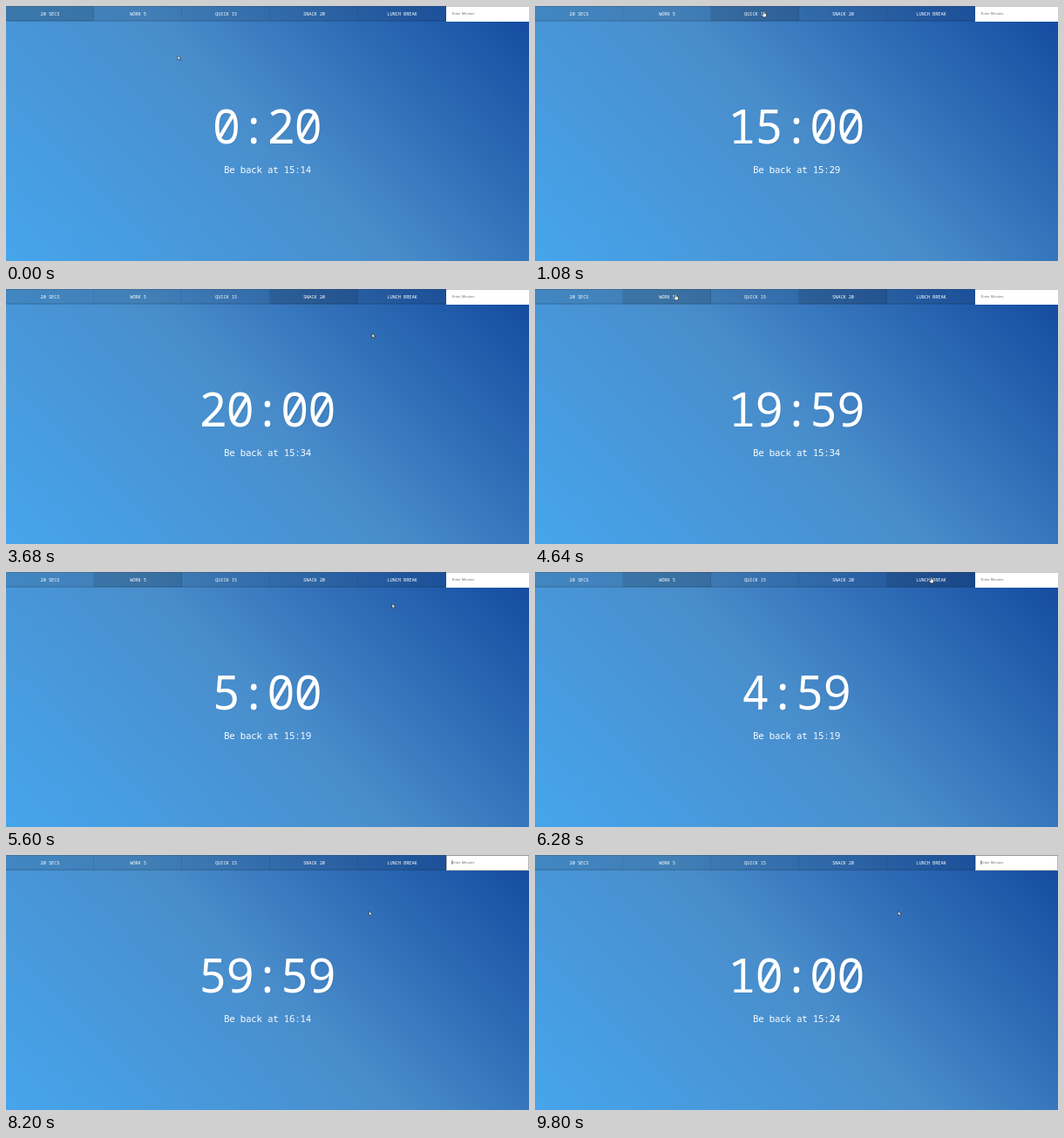
Recreate the animation shown at these times as an HTML page. Size 600 by 293 pixels, loop 9.96 s.

```html
<!DOCTYPE html>
<html lang="en">
<head>
<meta charset="utf-8">
<title>Countdown timer</title>
<style>
  html, body { margin: 0; width: 100%; height: 100%; overflow: hidden; }
  svg {
    display: block; width: 100vw; height: 100vh;
    background: linear-gradient(45deg, #46a5ec 0%, #498dcb 50%, #12499f 100%);
  }
  text { fill: #fff; white-space: pre; }
  .mono { font-family: 'Noto Sans Mono', monospace; letter-spacing: -.021em; text-anchor: middle; }
  .label { font-size: 5.4px; }
  #left { font-size: 54px; font-weight: 350; text-shadow: 1.25px 1.25px 0 rgba(0, 0, 0, .05); }
  #back { font-size: 10.8px; }
  #entry { font: 4.17px 'Liberation Sans', Arial, sans-serif; }
  #cursor { fill: #fff; stroke: #111; stroke-width: .5; stroke-linejoin: round; }
</style>
</head>
<body>
<svg viewBox="0 0 600 293">
  <g id="buttons"></g>
  <rect x="505" width="95" height="18" fill="#fff"/>
  <rect id="ring" x="505.4" y=".5" width="94.2" height="17.1" fill="none" stroke="#9c9a94" stroke-width=".7"/>
  <rect width="600" height=".6" fill="#4a4f60" opacity=".5"/>
  <text id="entry" x="511.75" y="10.2"></text>
  <rect id="caret" y="6.3" width=".5" height="4.7" fill="#111"/>
  <text id="left" class="mono" x="299.3" y="157.6"></text>
  <text id="back" class="mono" x="299.9" y="192"></text>
  <path id="cursor"/>
</svg>
<script>
const LOOP = 9960, STEP = 40, BUTTON = 101, BAR = 17.5;
const INPUT = 5, INPUT_FOCUS = 7160, TYPING = 8560, KEY_TIME = 80, CARET_RESTART = 8760, BLINK = 520;
const OPENED = 15 * 60 + 14; // clock time in minutes

const controls = [
  { label: '20 SECS', minutes: 1 / 3 },
  { label: 'WORK 5', minutes: 5 },
  { label: 'QUICK 15', minutes: 15 },
  { label: 'SNACK 20', minutes: 20 },
  { label: 'LUNCH BREAK', minutes: 60 },
  { minutes: 10 }
];
const starts = [
  { at: -600, control: 0 }, { at: 1040, control: 2 }, { at: 3120, control: 3 },
  { at: 4800, control: 1 }, { at: 6360, control: 4 }, { at: 9440, control: INPUT }
];

// Pointer moves; it rests between one arrival and the next departure.
const over = (control, part = .6) => ({ x: (control + part) * BUTTON, y: 9 });
const home = { x: 197, y: 57 };
const moves = [
  { leave: 40, arrive: 800, to: over(2) },
  { leave: 1440, arrive: 1840, to: { x: 354, y: 67 } },
  { leave: 2040, arrive: 2600, to: { x: 446.5, y: 36.5 } },
  { leave: 2600, arrive: 2840, to: over(4, .4) },
  { leave: 2840, arrive: 3080, to: over(3, .9) },
  { leave: 3400, arrive: 3680, to: { x: 420, y: 51 } },
  { leave: 3680, arrive: 4560, to: over(1) },
  { leave: 4920, arrive: 5360, to: over(4, .4) },
  { leave: 5360, arrive: 5600, to: { x: 443, y: 36.5 } },
  { leave: 5600, arrive: 6080, to: over(4, .5) },
  { leave: 6440, arrive: 6880, to: over(INPUT, .13) },
  { leave: 7320, arrive: 7680, to: { x: 416.5, y: 64.5 } }
];

const shapes = {
  arrow: 'M0 0V5L1.2 4 2 5.9 2.9 5.5 2.1 3.7H3.7Z',
  hand: 'M-.7-2.4Q0-3.4.7-2.4V-.6L2.8 0V2L2.2 3.8H-.6L-2.3 1.4-1.8.6-.7 1.3Z',
  beam: 'M-1-3H1M0-3V3M-1 3H1'
};

const $ = id => document.getElementById(id);
const twoDigits = n => String(n).padStart(2, '0');
const clock = (big, small) => `${big}:${twoDigits(small)}`;
const ease = u => u * u * (3 - 2 * u);
const clamp = u => Math.min(1, Math.max(0, u));

$('buttons').innerHTML = controls.slice(0, INPUT).map(({ label }, i) => `
  <g transform="translate(${i * BUTTON})">
    <rect class="face" width="${BUTTON}" height="${BAR}"/>
    <path d="M0 ${BAR - .94}H${BUTTON}V${BAR}H0ZM${BUTTON - .4} 0H${BUTTON}V${BAR - .94}H${BUTTON - .4}Z" opacity=".2"/>
    <text class="mono label" x="${BUTTON / 2}" y="10.6">${label}</text>
  </g>`).join('');
const faces = document.querySelectorAll('.face');

function pointerAt(t) {
  return moves.reduce(({ x, y }, { leave, arrive, to }) => {
    const u = ease(clamp((t - leave) / (arrive - leave)));
    return { x: x + (to.x - x) * u, y: y + (to.y - y) * u };
  }, home);
}

function renderTimer(t, { at, control }) {
  const { minutes } = controls[control];
  const seconds = Math.round(minutes * 60) - Math.floor((t - at) / 1000);
  const end = OPENED + Math.floor(minutes);
  $('left').textContent = clock(Math.floor(seconds / 60), seconds % 60);
  $('back').textContent = `Be back at ${clock(Math.floor(end / 60), end % 60)}`;
}

function renderPointer({ x, y }, hovered) {
  const shape = hovered < 0 ? 'arrow' : hovered === INPUT ? 'beam' : 'hand';
  $('cursor').setAttribute('d', shapes[shape]);
  $('cursor').setAttribute('transform', `translate(${x} ${y})`);
}

function renderInput(t, submitted) {
  const keys = Math.max(0, Math.floor((t - TYPING) / KEY_TIME));
  const typed = submitted ? '' : '10'.slice(0, keys);
  $('entry').textContent = typed || 'Enter Minutes';
  $('entry').style.fill = typed ? '#000' : '#757575';

  const active = t >= INPUT_FOCUS;
  const blinks = Math.floor((t - (t < CARET_RESTART ? INPUT_FOCUS : CARET_RESTART)) / BLINK);
  $('caret').setAttribute('x', 511.6 + typed.length * 2.32);
  $('caret').setAttribute('opacity', active && blinks % 2 === 0 ? 1 : 0);
  $('ring').setAttribute('opacity', active ? 1 : 0);
}

function render(t) {
  const timer = starts.findLast(start => start.at <= t);
  const pointer = pointerAt(t);
  const hovered = pointer.y < BAR ? Math.min(INPUT, Math.floor(pointer.x / BUTTON)) : -1;
  const focused = t >= INPUT_FOCUS ? INPUT : timer.control;
  faces.forEach((face, i) =>
    face.setAttribute('opacity', i === hovered || i === focused ? .2 : .1));
  renderTimer(t, timer);
  renderInput(t, timer.control === INPUT);
  renderPointer(pointer, hovered);
}

const began = performance.now();
function frame() {
  const t = (performance.now() - began) % LOOP;
  render(Math.floor(t / STEP) * STEP);
  requestAnimationFrame(frame);
}
frame();
</script>
</body>
</html>
```
